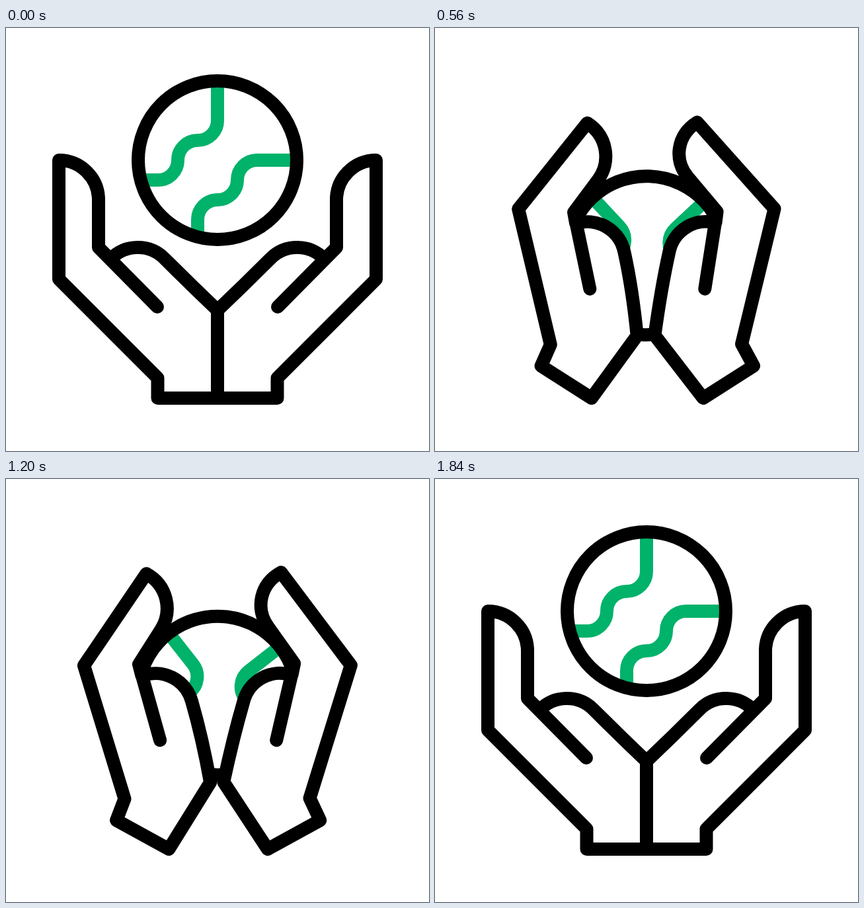
Recreate the animation shown at these times as an HTML page. Size 640 by 640 pixels, loop 2 s.

```html
<!DOCTYPE html>
<html lang="en">
<head>
<meta charset="utf-8">
<title>Hands and globe</title>
<style>
  html, body { margin: 0; width: 100%; height: 100%; overflow: hidden; background: #fff; }
  svg { display: block; width: 100%; height: 100%; }
  .ink { fill: #fff; stroke: #000; stroke-width: 20; stroke-linejoin: round; stroke-linecap: round; }
  .land { fill: none; stroke: #00b26a; stroke-width: 20; }
  .ring { fill: none; stroke: #000; stroke-width: 20; }
</style>
</head>
<body>
<svg viewBox="0 0 640 640">
  <g id="globe">
    <circle r="120" fill="#fff"/>
    <path class="land" d="M0-120V-60A30 30 0 0 1-30-30A30 30 0 0 0-60 0A30 30 0 0 1-90 30H-112"/>
    <path class="land" d="M115 0H60A30 30 0 0 0 30 30A30 30 0 0 1 0 60A30 30 0 0 0-30 90V112"/>
    <circle class="ring" r="120"/>
  </g>
  <g id="left"><path class="ink"/></g>
  <g transform="translate(640 0) scale(-1 1)"><g id="right"><path class="ink"/></g></g>
</svg>
<script>
const LOOP = 2000, HALF = 1000, TICK = 40;

// Progress of one closing move: [ms, amount]
const STEPS = [[0, 0], [40, .027], [200, .207], [240, .28], [440, .671], [560, .896], [680, .98], [840, 1]];

// Open hand, relative to its inner bottom corner
const OPEN = {
  tip: [-240, -360], side: [-180, -300], knuckle: [-180, -228], web: [-162, -210],
  thumb: [-80, -211], base: [0, -133], wrist: [-90.5, -30.5], elbow: [-240, -180]
};

// How far each point drifts when the hand closes
const HANDS = [
  { id: 'left', slide: 92.8, drift: {
    tip: [12, 14], side: [12, 18], knuckle: [7, 6], thumb: [3.5, -2],
    base: [8, 18], wrist: [-6, -5], elbow: [-8, -2] } },
  { id: 'right', slide: 95.7, drift: {
    tip: [26, 3.5], side: [22, 6], knuckle: [12, 1.5], web: [4, -4], thumb: [5, -3.5],
    base: [12, 15], wrist: [-3, -8], elbow: [-5.5, -4] } }
];

const globe = document.getElementById('globe');
for (const hand of HANDS) {
  hand.group = document.getElementById(hand.id);
  hand.path = hand.group.firstElementChild;
}

function slope(i) {
  if (i === 0 || i === STEPS.length - 1) return 0;
  const [t0, v0] = STEPS[i - 1], [t1, v1] = STEPS[i + 1];
  return (v1 - v0) / (t1 - t0);
}

// Smooth cubic through the steps
function ease(t) {
  const last = STEPS.length - 1;
  if (t >= STEPS[last][0]) return 1;
  let i = 0;
  while (t >= STEPS[i + 1][0]) i++;
  const [t0, v0] = STEPS[i], [t1, v1] = STEPS[i + 1];
  const span = t1 - t0, u = (t - t0) / span, w = 1 - u;
  return v0 * (1 + 2 * u) * w * w + v1 * u * u * (3 - 2 * u)
    + span * u * w * (slope(i) * w - slope(i + 1) * u);
}

function outline(drift, p) {
  const at = {};
  for (const name in OPEN) {
    const [dx, dy] = drift[name] || [0, 0];
    at[name] = [OPEN[name][0] + dx * p, OPEN[name][1] + dy * p];
  }
  const { tip, side, knuckle, web, thumb, base, wrist, elbow } = at;
  const lean = (side[0] - knuckle[0]) / 2; // keeps the fingertip in line with the finger
  return `M${tip}C${tip[0] + 33 + 4 * p} ${tip[1]} ${side[0] + lean} ${side[1] - 33} ${side}`
    + `L${knuckle}L${web}A57 57 0 0 1 ${thumb}`
    + `Q${thumb[0] + 40} ${thumb[1] + 40} ${base}`
    + `L0 0L-90.5 0L${wrist}L${elbow}Z`
    + `M${knuckle}L-91 -138`;
}

function draw(p) {
  globe.setAttribute('transform', `translate(320 ${200 + 161 * p}) rotate(${-48 * p})`);
  for (const { group, path, slide, drift } of HANDS) {
    group.setAttribute('transform', `translate(${320 - slide * p} 560) rotate(${36.3 * p})`);
    path.setAttribute('d', outline(drift, p));
  }
}

const start = performance.now();
function frame() {
  const time = (performance.now() - start) % LOOP;
  const t = Math.floor(time / TICK) * TICK;
  draw(t < HALF ? ease(t) : 1 - ease(t - HALF));
  requestAnimationFrame(frame);
}
draw(0);
requestAnimationFrame(frame);
</script>
</body>
</html>
```
